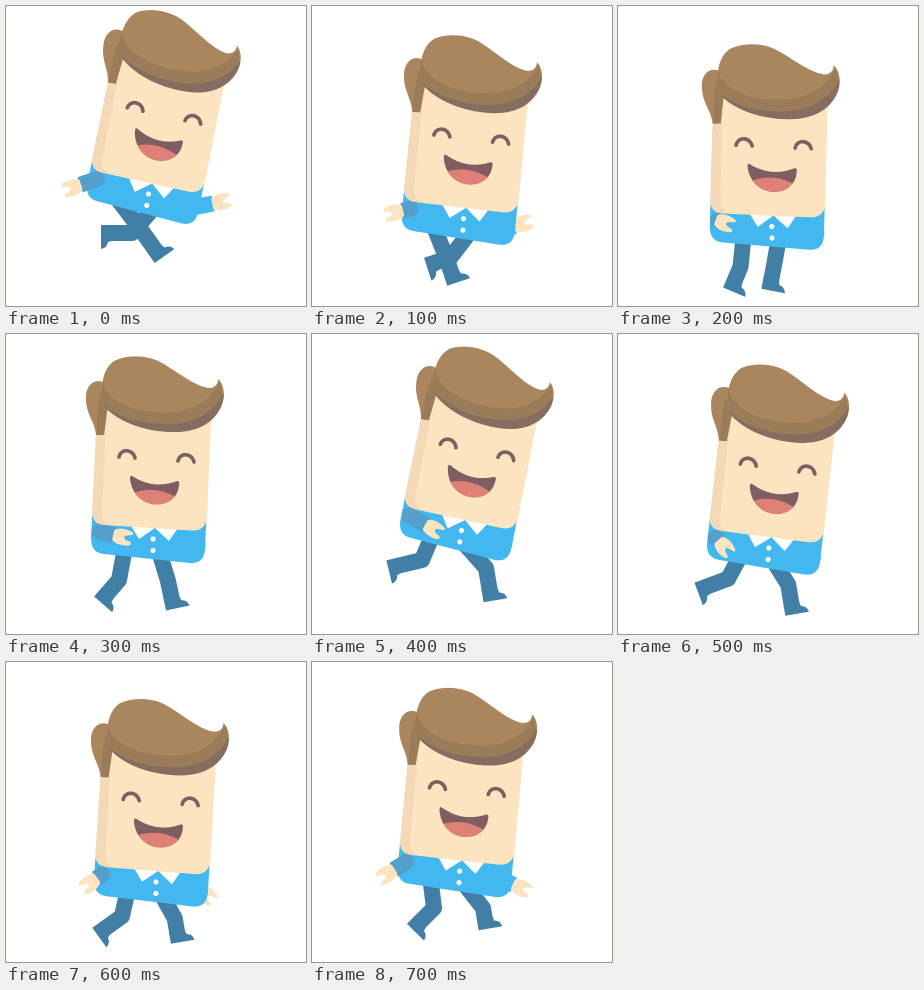
Recreate the animation shown at these times as an HTML page with a canvas. Size 300 by 300 pixels, loop 0.8 s.

```html
<!DOCTYPE html>
<html lang="en">
<head>
<meta charset="utf-8">
<title>Running man</title>
<style>
html, body { margin: 0; height: 100%; overflow: hidden; background: #fff; }
canvas { display: block; width: 100vw; height: 100vh; }
</style>
</head>
<body>
<canvas></canvas>
<script>
const canvas = document.querySelector('canvas');
const ctx = canvas.getContext('2d');
const ratio = Math.max(2, window.devicePixelRatio || 1);
canvas.width = canvas.height = 300 * ratio;

const SKIN = '#fce4c0', SKIN_SHADE = '#f3d9b6', DARK = '#7f5d61', TONGUE = '#de7f78';
const HAIR = '#aa865f', HAIR_SHADE = '#9a7d58', HAIR_DARK = '#866d62';
const SHIRT = '#43b8f0', SLEEVE = '#559fcd', PANTS = '#417fa6';
const FRAME = 100, STEP_FRAMES = 4, LEAN_BACK = 3.4;

// Each step runs from a leap to a push-off and sinks in between.
// Body is x, y, degrees; legs (knee, ankle) and hands are offsets from it.
const steps = [
  {
    leap: { body: [158.5, 106.5, 8.7], legA: [-20.5, 121.5, -8.5, 138.5],
            legB: [-32.5, 120.5, -54.5, 120.5], near: [-92, 75], far: [56.5, 89.5] },
    push: { body: [150.5, 122, 0], legA: [-37.5, 124, -50.5, 139],
            legB: [11.5, 125, 15.5, 144], near: [-34.5, 81], far: [34.5, 83] },
    sink: [3, 19.5],
  },
  {
    leap: { body: [165.5, 115, 8.7], legA: [-55.5, 111, -80.5, 117],
            legB: [8.5, 119, 12.5, 143], near: [-44.5, 80], far: [20, 85] },
    push: { body: [155, 126.5, 2.7], legA: [-33, 119.5, -48, 134.5],
            legB: [16, 119.5, 18, 131.5], near: [-80, 85.5], far: [54, 99.5] },
    sink: [-3, 13.5],
  },
];

function poseAt(frame) {
  const { leap, push, sink } = steps[Math.floor(frame / STEP_FRAMES) % steps.length];
  const t = frame % STEP_FRAMES / (STEP_FRAMES - 1);
  const ease = t * t * (3 - 2 * t);
  const dip = Math.sin(Math.PI * t) / Math.sin(Math.PI / 3);
  const pose = {};
  for (const part in leap) {
    pose[part] = leap[part].map((v, i) => v + (push[part][i] - v) * ease);
  }
  pose.body[0] += sink[0] * dip;
  pose.body[1] += sink[1] * dip;
  pose.body[2] -= LEAN_BACK * dip;
  return pose;
}

function fill(d, color) {
  ctx.fillStyle = color;
  ctx.fill(new Path2D(d));
}

function dot(x, y, r, color) {
  ctx.fillStyle = color;
  ctx.beginPath();
  ctx.arc(x, y, r, 0, 7);
  ctx.fill();
}

function line(points, color, width) {
  ctx.beginPath();
  points.forEach(([x, y]) => ctx.lineTo(x, y));
  ctx.strokeStyle = color;
  ctx.lineWidth = width;
  ctx.lineCap = 'butt';
  ctx.lineJoin = 'round';
  ctx.stroke();
}

function placed(x, y, angle, draw) {
  ctx.save();
  ctx.translate(x, y);
  ctx.rotate(angle);
  draw();
  ctx.restore();
}

const clipped = (d, draw) => {
  ctx.save();
  ctx.clip(new Path2D(d));
  draw();
  ctx.restore();
};

// The foot stands square to the shin
function leg(hip, [kx, ky, ax, ay]) {
  line([hip, [kx, ky], [ax, ay]], PANTS, 16);
  placed(ax, ay, Math.atan2(ay - ky, ax - kx) - Math.PI / 2, () =>
    fill('M-8-2H8L9 2Q15 3 16 9H-8Z', PANTS));
}

function arm([sx, sy], [hx, hy], color) {
  const angle = Math.atan2(hy - sy, hx - sx);
  const wrist = [hx - 8 * Math.cos(angle), hy - 8 * Math.sin(angle)];
  dot(sx, sy, 8, color);
  line([[sx, sy], wrist], color, 16);
  placed(hx, hy, angle, () =>
    fill('M-9-5C-5-9 3-9 9-7Q12-5 9-4L3-2Q1 0 4 2L9 3Q12 5 8 7C1 9-5 8-9 5Z', SKIN));
}

function shirt() {
  fill('M92 60L85 204Q85 219 98 220L184 229Q198 230 199 215L206 60Z', SHIRT);
  fill('M124 190L133 205L149 194L163 207L172 194Z', '#fff');
  dot(147, 205, 2.6, '#fff');
  dot(147, 216.5, 2.6, '#fff');
}

function face() {
  fill('M92 60L86 178Q86 190 98 191L186 196.5Q200 197 201 182L206 60Z', SKIN_SHADE);
  fill('M101 60L96 178Q96 190 107 191.5L186 196.5Q200 197 201 182L206 60Z', SKIN);
  ctx.strokeStyle = DARK;
  ctx.lineWidth = 3.6;
  ctx.lineCap = 'round';
  ctx.stroke(new Path2D('M113 123C115 114 127 115 129 124M172 127C174 118 186 119 188 128'));
  const mouth = 'M126 142Q148 156 171 147Q174 147 173 151C171 178 128 178 124 145Q124 141 126 142Z';
  fill(mouth, DARK);
  clipped(mouth, () => fill('M120 162Q148 148 175 166V185H120Z', TONGUE));
}

function hair() {
  fill('M99 49C88 43 79 52 80 65C80 80 89 88 90 101H98L102 70Z', HAIR);
  fill('M99 49C92 62 90 80 91 101H98L102 70Z', HAIR_SHADE);
  const shape = 'M98 72C93 50 98 34 108 27C122 20 143 21 156 29C172 38 188 52 203 54' +
    'C209 54 212 50 212 45C218 50 220 62 215 73C206 92 187 98 168 98C140 98 112 88 98 72Z';
  fill(shape, HAIR);
  clipped(shape, () => {
    fill('M96 48C104 74 140 80 168 78C192 76 208 62 214 47L225 100H90Z', HAIR_SHADE);
    fill('M96 70C118 87 142 91 168 90C194 88 212 74 219 56V105H96Z', HAIR_DARK);
  });
}

function draw({ body: [x, y, deg], legA, legB, near, far }) {
  ctx.setTransform(ratio, 0, 0, ratio, 0, 0);
  ctx.fillStyle = '#fff';
  ctx.fillRect(0, 0, 300, 300);
  ctx.translate(x, y);

  const angle = deg * Math.PI / 180;
  const cos = Math.cos(angle), sin = Math.sin(angle);
  const joint = (dx, dy) => [dx * cos - dy * sin, dx * sin + dy * cos];
  const leaning = part => placed(0, 0, angle, () => {
    ctx.translate(-150.5, -122);
    part();
  });

  leg(joint(3, 97), legB);
  leg(joint(-32, 94), legA);
  arm(joint(41, 90), far, SHIRT);
  leaning(shirt);
  arm(joint(-57, 76), near, SLEEVE);
  leaning(face);
  leaning(hair);
}

const start = performance.now();
function tick() {
  draw(poseAt(Math.floor((performance.now() - start) / FRAME)));
  requestAnimationFrame(tick);
}
tick();
</script>
</body>
</html>
```
